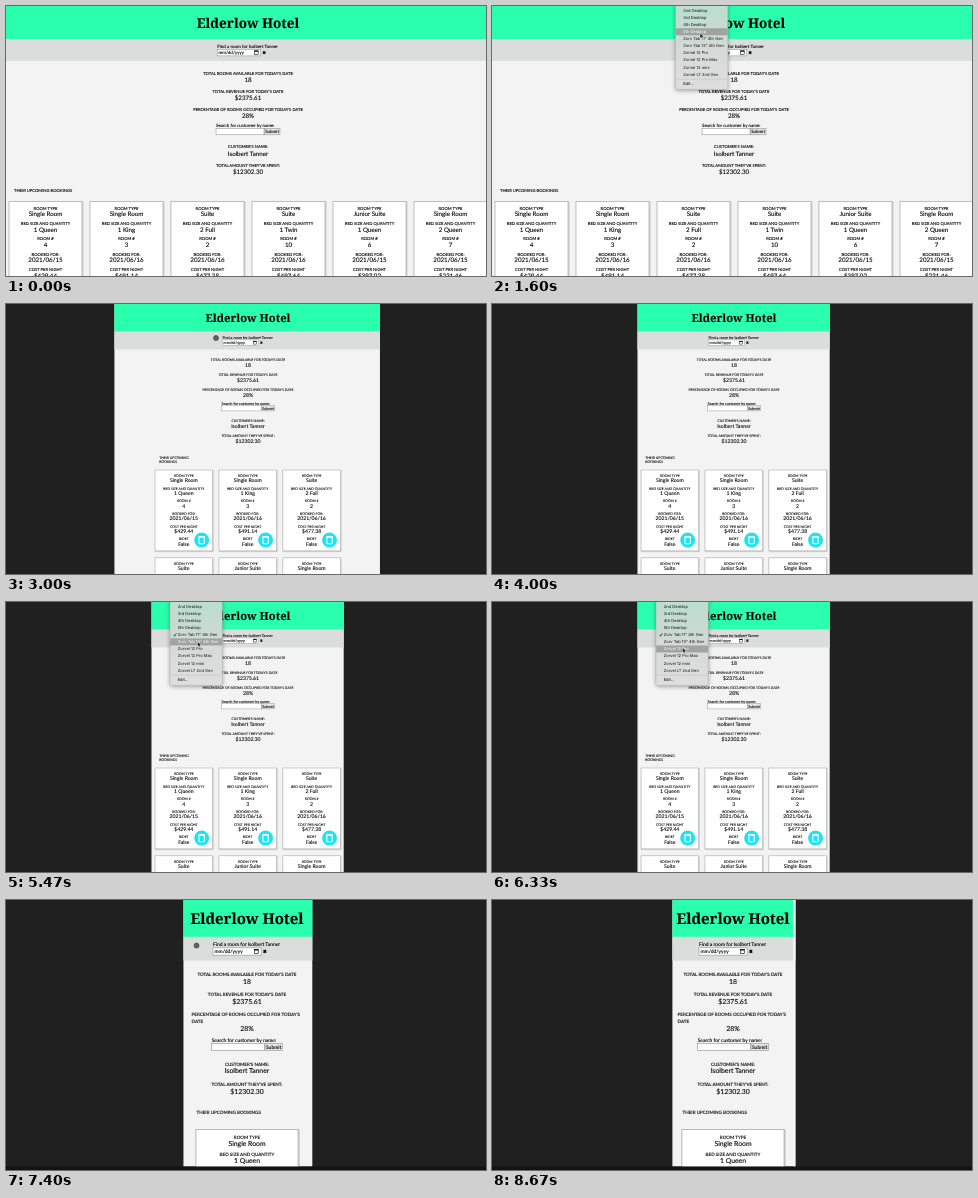
Animation, 480 px wide and 270 px high, one loop 9.27 s. Source, as an HTML page:

```html
<!DOCTYPE html>
<html lang="en">
<head>
<meta charset="utf-8">
<title>Hotel bookings at three sizes</title>
<style>
html, body { margin: 0; width: 100%; height: 100%; overflow: hidden; background: #202020; }
svg { display: block; width: 100vw; height: 100vh; }
text { font-family: Lato, sans-serif; text-rendering: geometricPrecision; }
#pages text { stroke: #000; stroke-width: .1px; }
.title { font-family: "Noto Serif", serif; font-weight: 700; }
#menu text { font-family: Inter, sans-serif; }
#panel { filter: drop-shadow(0 1px 2px rgba(0, 0, 0, .35)); }
</style>
</head>
<body>
<svg id="stage" viewBox="0 0 480 270">
  <defs>
    <clipPath id="view"><rect id="viewBox" width="480" height="270"/></clipPath>
    <linearGradient id="glass" x1="0" y1="0" x2="0" y2="1">
      <stop offset="0" stop-color="#b8dfcd"/>
      <stop offset=".35" stop-color="#c8dad2"/>
      <stop offset=".6" stop-color="#d8dad9"/>
      <stop offset="1" stop-color="#dedede"/>
    </linearGradient>
  </defs>
  <rect width="480" height="270" fill="#202020"/>
  <rect id="strip" y="266.3" width="480" height="3.7" fill="#171217"/>
  <g id="pages" clip-path="url(#view)"></g>
  <g id="menu"></g>
  <path id="arrow" d="M0 0V5.4L1.3 4.3L2.2 6.3L3.1 5.9L2.2 4H3.9Z" fill="#111" stroke="#fff" stroke-width=".5"/>
  <circle id="dot" r="2.5" fill="#555" fill-opacity=".9" stroke="#333" stroke-width=".6"/>
</svg>
<script>
const LOOP = 9270;
const GUEST = 'Isolbert Tanner';
const $ = id => document.getElementById(id);

const rect = (x, y, w, h, fill, extra = '') =>
  `<rect x="${x}" y="${y}" width="${w}" height="${h}" fill="${fill}" ${extra}/>`;

// y is the middle of the capitals
const text = (x, y, size, str, anchor = 'middle', extra = '') =>
  `<text x="${x}" y="${y + size * 0.36}" font-size="${size}" text-anchor="${anchor}" ${extra}>${str}</text>`;

const label = (x, y, str, anchor) => text(x, y, 4.15, str, anchor);
const value = (x, y, str) => text(x, y, 6.2, str);

const rooms = [
  ['Single Room', '1 Queen', 4, 15, 429.44],
  ['Single Room', '1 King', 3, 16, 491.14],
  ['Suite', '2 Full', 2, 16, 477.38],
  ['Suite', '1 Twin', 10, 16, 497.64],
  ['Junior Suite', '1 Queen', 6, 15, '397.02'],
  ['Single Room', '2 Queen', 7, 15, 231.46]
];
const fields = ['ROOM TYPE', 'BED SIZE AND QUANTITY', 'ROOM #', 'BOOKED FOR:', 'COST PER NIGHT', 'BIDET'];

function card(x, y, w, [type, beds, num, day, cost]) {
  const vals = [type, beds, num, '2021/06/' + day, '$' + cost, 'False'];
  const ix = x + w - 13.1, iy = y + 84.3;
  return rect(x + 0.7, y + 0.8, w, 97.4, 'none', 'stroke="#000" stroke-opacity=".15" stroke-width="1.6"')
    + rect(x, y, w, 97.4, '#fff', 'stroke="#aaa" stroke-width=".7"')
    + fields.map((f, i) => label(x + w / 2, y + 6.8 + i * 15.3, f)
      + value(x + w / 2, y + 12.7 + i * 15.3, vals[i])).join('')
    + `<circle cx="${ix}" cy="${iy}" r="9" fill="#1de3f2"/>`
    + rect(ix - 3.2, iy - 3.6, 6.4, 8, 'none', 'rx=".8" stroke="#fff" stroke-width="1.3"')
    + rect(ix - 3.8, iy - 4.8, 7.6, 1.8, '#fff');
}

// One page in shared units: k scales it, cx is the middle of its text
function page({ k, cx, wrap, top, cols, left, pitch, w, headX, head }) {
  let s = rect(-300, 0, 600, 400, '#f3f3f3')
    + rect(-300, 0, 600, 33.4, '#2affae')
    + rect(-300, 33.4, 600, 21.4, '#dadddc')
    + text(0, 17, 13.5, 'Elderlow Hotel', 'middle', 'class="title"')
    + text(-30.8, 40.3, 4.5, 'Find a room for ' + GUEST, 'start')
    + rect(-30.8, 43.3, 43.6, 6.6, '#fff', 'stroke="#888" stroke-width=".5"')
    + text(-29.4, 46.4, 4.5, 'mm/dd/yyyy', 'start')
    + rect(6.6, 44.9, 3.6, 3.4, 'none', 'stroke="#111" stroke-width=".6"')
    + rect(6.4, 44.5, 4, 1.2, '#111')
    + '<path d="M15 45.4l2.3 2.3m0-2.3l-2.3 2.3" stroke="#111" stroke-width="1.4"/>'
    + label(0, 67.2, 'TOTAL ROOMS AVAILABLE FOR TODAY\'S DATE') + value(0, 73.4, '18')
    + label(0, 85.2, 'TOTAL REVENUE FOR TODAY\'S DATE') + value(0, 91.5, '$2375.61');
  const rate = 'PERCENTAGE OF ROOMS OCCUPIED FOR TODAY\'S';
  s += wrap
    ? label(-50.2, 103.2, rate, 'start') + label(-50.2, 110, 'DATE', 'start')
    : label(0, 103.2, rate + ' DATE');
  s += `<g transform="translate(0 ${wrap})">`
    + value(0, 109.3, '28%')
    + text(-32, 119.8, 4.5, 'Search for customer by name:', 'start')
    + rect(-32, 122.4, 48, 6.4, '#fff', 'stroke="#888" stroke-width=".5"')
    + rect(16.3, 122.4, 15.7, 6.4, '#e6e6e6', 'stroke="#888" stroke-width=".5"')
    + text(24.1, 125.5, 4.5, 'Submit')
    + label(0, 141, 'CUSTOMER\'S NAME:') + value(0, 147.4, GUEST)
    + label(0, 159.1, 'TOTAL AMOUNT THEY\'VE SPENT:') + value(0, 165.6, '$12302.30')
    + head.map((h, i) => label(headX, 184.7 + i * 4.9, h, 'start')).join('')
    + '</g>';
  s += rooms.map((r, i) =>
    card(left + i % cols * pitch, top + Math.floor(i / cols) * 105.8, w, r)).join('');
  return `<g transform="translate(${cx} 0) scale(${k})">${s}</g>`;
}

const heading = 'THEIR UPCOMING BOOKINGS';
const layouts = [
  { k: 1, cx: 242, wrap: 0, top: 195.5, cols: 6, left: -239, pitch: 81, w: 73, headX: -234, head: [heading], box: [0, 480, 270] },
  { k: 0.83, cx: 242, wrap: 0, top: 200, cols: 3, left: -112, pitch: 77, w: 69.3, headX: -107, head: ['THEIR UPCOMING', 'BOOKINGS'], box: [145.5, 337.7, 270] },
  { k: 1.105, cx: 241, wrap: 7.3, top: 207.7, cols: 1, left: -46.2, pitch: 0, w: 92.4, headX: -45.7, head: [heading], box: [180.4, 303.4, 266.3] }
];
// The narrowest page keeps a pale scroll gutter on its right
$('pages').innerHTML = layouts.map(page).join('') + rect(301.2, 0, 3, 270, '#f6f6f6', 'id="gutter"');
const groups = [...$('pages').querySelectorAll(':scope > g')];

const items = ['2nd Desktop', '3rd Desktop', '4th Desktop', '5th Desktop',
  'Zorv Tab 11" 4th Gen', 'Zorv Tab 13" 4th Gen', 'Zorvel 12 Pro',
  'Zorvel 12 Pro Max', 'Zorvel 12 mini', 'Zorvel LT 2nd Gen'];
const rowY = i => 4.6 + i * 7.06;
$('menu').innerHTML = rect(0, -5, 52.3, 88.4, 'url(#glass)', 'id="panel" rx="2.2" stroke="#aaa" stroke-width=".4"')
  + rect(0.2, 0, 51.9, 7, '#9fa3a1', 'id="hover"')
  + items.map((n, i) => text(7.7, rowY(i), 4.05, n, 'start', 'class="item"')).join('')
  + '<path d="M0 73.2H52" stroke="#bbb" stroke-width=".5"/>'
  + text(7.7, 78, 4.05, 'Edit...', 'start')
  + `<path id="tick" d="M3.6 ${rowY(4)}l1 1.4l1.8-3" fill="none" stroke="#111" stroke-width=".7"/>`;
const names = [...document.querySelectorAll('.item')];

const clamp = v => Math.min(1, Math.max(0, v));
const ease = v => v * v * (3 - 2 * v);
const mix = (a, b, v) => a + (b - a) * v;
const show = (el, on) => { el.style.display = on ? '' : 'none'; };

// Pointer stops: time, x, y
const path = [
  [1330, 204, -7], [1600, 208, 27], [1830, 209, 47], [2130, 210, 34], [3400, 210, 34], [3930, 198, -7],
  [5270, 190, -7], [5470, 191.5, 39.5], [5730, 192, 50], [6130, 190.5, 45.6], [7600, 190.5, 45.6], [8130, 186, -7]
];
function pointer(t) {
  const i = path.findIndex(p => p[0] > t);
  if (i < 1) return [0, -9];
  const [a, b] = [path[i - 1], path[i]];
  const v = ease((t - a[0]) / (b[0] - a[0]));
  return [mix(a[1], b[1], v), mix(a[2], b[2], v)];
}

// Menu: opens, closes, left edge
const menus = [[130, 2530, 183.5], [4730, 6850, 164]];
const FADE = 170;
// Resizes: time, length
const turns = [[2800, 300], [7130, 330]];

function draw(t) {
  const stage = turns.filter(m => t >= m[0]).length;
  groups.forEach((g, i) => show(g, i === stage));
  let [l, r, h] = layouts[stage].box;
  let turned = 1;
  if (stage) {
    const [start, len] = turns[stage - 1];
    const from = layouts[stage - 1].box;
    turned = ease(clamp((t - start) / len));
    l = mix(from[0], l, turned);
    r = mix(from[1], r, turned);
  }
  const view = $('viewBox');
  view.setAttribute('x', l);
  view.setAttribute('width', r - l);
  view.setAttribute('height', h);
  show($('strip'), stage === 2);
  show($('gutter'), stage === 2 && turned === 1);

  const [x, y] = pointer(t);
  const open = menus.find(m => t >= m[0] && t < m[1] + FADE);
  show($('menu'), open);
  if (open) {
    $('menu').setAttribute('transform', `translate(${open[2]} 0)`);
    $('menu').setAttribute('opacity', 1 - clamp((t - open[1]) / FADE));
    const row = y < 0 ? -1 : Math.round((y - rowY(0)) / 7.06);
    $('hover').setAttribute('y', row < 0 ? -20 : rowY(row) - 3.5);
    names.forEach((n, i) => n.setAttribute('fill', i === row ? '#fff' : '#111'));
    show($('tick'), stage);
  }
  const at = `translate(${x} ${y})`;
  $('arrow').setAttribute('transform', at);
  $('dot').setAttribute('transform', at);
  show($('arrow'), open);
  show($('dot'), !open);
}

const begin = performance.now();
function tick() {
  draw((performance.now() - begin) % LOOP);
  requestAnimationFrame(tick);
}
tick();
</script>
</body>
</html>
```
